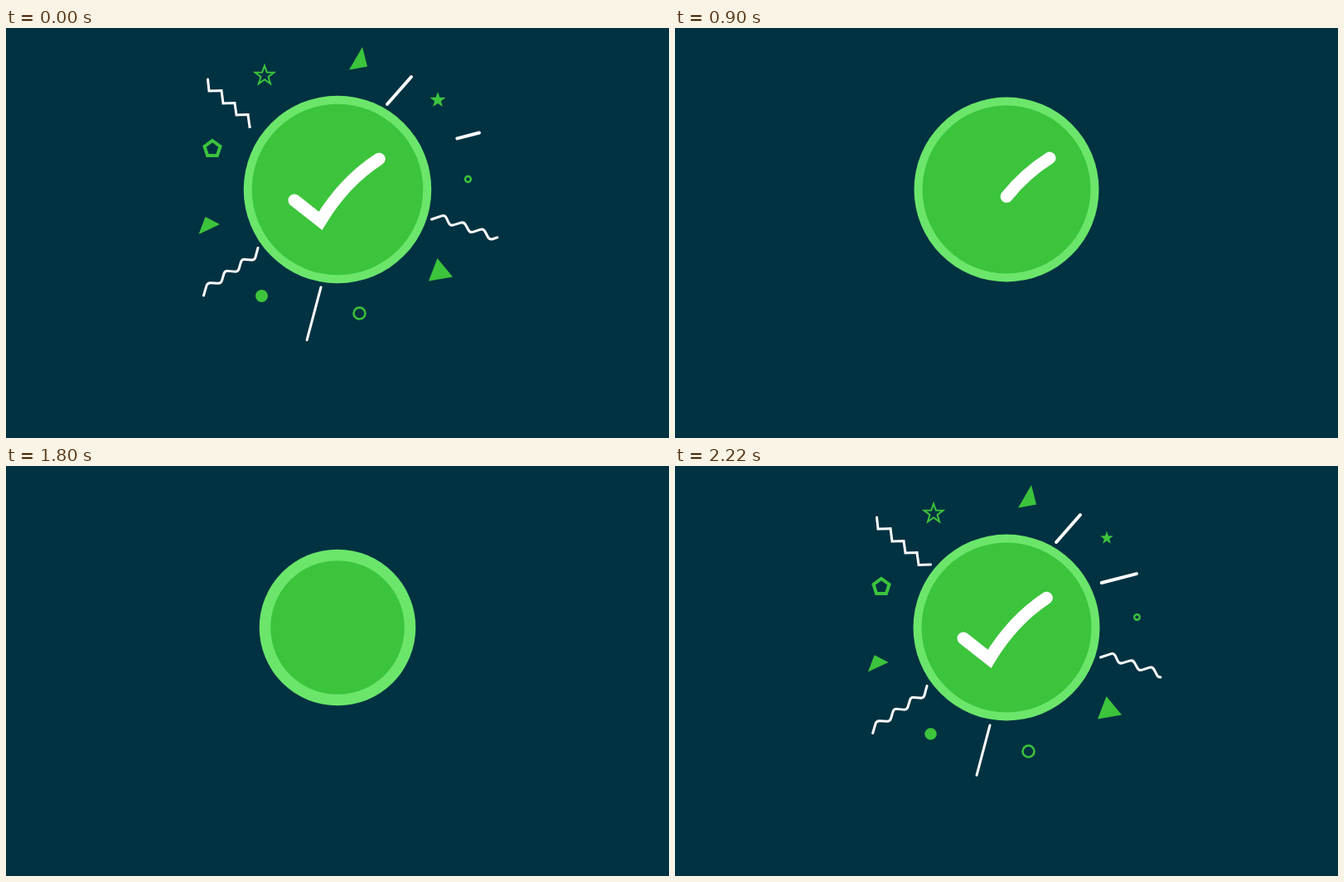
Recreate the animation shown at these times as an HTML page. Size 800 by 495 pixels, loop 2.25 s.

```html
<!DOCTYPE html>
<html lang="en">
<head>
<meta charset="utf-8">
<title>Success burst</title>
<style>
  html, body { margin: 0; width: 100%; height: 100%; overflow: hidden; background: #003241; }
  svg { display: block; width: 100%; height: 100%; }
</style>
</head>
<body>
<svg id="stage" viewBox="0 0 800 495"></svg>
<script>
const LOOP = 2250, STEP = 30, GREEN = '#3cc43c', LIGHT = '#6be66b';
const stage = document.getElementById('stage');

function add(tag, attrs) {
  const el = document.createElementNS('http://www.w3.org/2000/svg', tag);
  for (const key in attrs) el.setAttribute(key, attrs[key]);
  return stage.appendChild(el);
}

const clamp = x => Math.max(0, Math.min(1, x));
const part = (t, start, length) => clamp((t - start) / length);
const cubicOut = x => 1 - (1 - x) ** 3;
const sineInOut = x => (1 - Math.cos(Math.PI * x)) / 2;

// Polyline path whose corners are rounded off by the given distance.
function linePath(points, round = 0) {
  const towards = (a, b) => {
    const k = round / Math.hypot(b[0] - a[0], b[1] - a[1]);
    return [a[0] + (b[0] - a[0]) * k, a[1] + (b[1] - a[1]) * k];
  };
  return 'M' + points.map((p, i) => {
    if (!round || i === 0 || i === points.length - 1) return p;
    return towards(p, points[i - 1]) + 'Q' + p + ' ' + towards(p, points[i + 1]);
  }).join('L');
}

function radialPath(corners, radius, innerRatio) {
  const count = innerRatio ? corners * 2 : corners, points = [];
  for (let i = 0; i < count; i++) {
    const r = innerRatio && i % 2 ? radius * innerRatio : radius;
    const a = i / count * 2 * Math.PI;
    points.push([r * Math.sin(a), -r * Math.cos(a)]);
  }
  return linePath(points) + 'Z';
}

const discPath = r => `M${-r} 0A${r} ${r} 0 1 1 ${r} 0A${r} ${r} 0 1 1 ${-r} 0Z`;

function showSpan(el, from, to) {
  el.setAttribute('visibility', to - from > 0.002 ? 'visible' : 'hidden');
  el.setAttribute('stroke-dasharray', `${to - from} 3`);
  el.setAttribute('stroke-dashoffset', -from);
}

function stroke(d, width) {
  return add('path', {
    d, fill: 'none', stroke: '#fff', 'stroke-width': width, 'stroke-linecap': 'round',
    'stroke-miterlimit': 8, pathLength: 1
  });
}

// White rays: drawn outwards, then wiped from the inner end.
const rays = [
  { d: linePath([[507, 143], [571, 126.5]]), width: 4, start: 1910, grow: 160, wipe: 2195, span: 0.66 },
  { d: linePath([[308.5, 119], [294, 119.5], [292, 104.5], [278, 105], [276, 90.5], [262, 91],
      [260, 75.5], [245, 76], [243.5, 62]]), width: 3, start: 1980, grow: 250, wipe: 2225 },
  { d: linePath([[460, 92], [489, 59]]), width: 4, start: 1985, grow: 220, wipe: 2265 },
  { d: linePath([[304, 265.5], [300, 280.5], [284.5, 279], [280, 294.5], [264, 293], [259.5, 308.5],
      [243, 307.5], [238.5, 323]], 4), width: 3, start: 2010, grow: 250, wipe: 2290 },
  { d: linePath([[380, 313], [362.5, 379]]), width: 3, start: 2075, grow: 260, wipe: 2340 },
  { d: linePath([[513.5, 231], [529.5, 225.5], [536, 239], [552.5, 234], [560, 247.5], [576, 242],
      [583.5, 256], [598.5, 251]], 4), width: 3, start: 2090, grow: 260, wipe: 2340 }
].map(ray => ({ span: 1, ...ray, el: stroke(ray.d, ray.width) }));

// Green confetti: path around its own centre, stroke width 0 means filled.
const confetti = [
  { x: 425.5, y: 37, d: 'M4.5-14L10.5 9.5L-11.5 13.5Z', width: 0, start: 1938, leave: 310 },
  { x: 426.5, y: 344.5, d: discPath(7), width: 2.5, start: 1938, leave: 310 },
  { x: 312, y: 57.5, d: radialPath(5, 12, 0.4), width: 2, start: 2011, leave: 370 },
  { x: 249, y: 146, d: radialPath(5, 10), width: 4, start: 2011, leave: 370 },
  { x: 524, y: 293, d: 'M-3.5-15L15 7.5L-14 12.5Z', width: 0, start: 2011, leave: 370 },
  { x: 244.5, y: 238, d: 'M-4-10L13.5-1L-12 11Z', width: 0, start: 2085, leave: 430 },
  { x: 308.5, y: 323.5, d: discPath(7.5), width: 0, start: 2085, leave: 430 },
  { x: 557.5, y: 182.5, d: discPath(3.5), width: 2.5, start: 2100, leave: 490 },
  { x: 521, y: 87, d: radialPath(5, 11.5, 0.4), width: 0, start: 2151, leave: 490 }
].map(piece => ({
  ...piece,
  el: add('path', {
    d: piece.d, fill: piece.width ? 'none' : GREEN, 'stroke-miterlimit': 8,
    stroke: piece.width ? GREEN : 'none', 'stroke-width': piece.width
  })
}));

const rim = add('circle', { cx: 400, cy: 195, fill: LIGHT });
const face = add('circle', { cx: 400, cy: 195, fill: GREEN });
const tick = stroke('M348 208L379.5 232.8Q409 184 452 157', 15);

// Quick rise, then a damped swing around the resting radius.
function badgeRadius(t) {
  if (t < 1800) return 88.75 * part(t, 1650, 150) ** 2;
  const s = t - 2198;
  return 106.5 * (1 + 0.03 * Math.exp(-0.0064 * s) * Math.sin(0.017 * s));
}

function draw(time) {
  // The burst runs over the loop seam, so its timeline extends past one loop.
  const t = time < 1200 ? time + LOOP : time;

  for (const ray of rays) {
    const tail = part(t, ray.wipe, 72) ** 2;
    const head = ray.span * cubicOut(part(t, ray.start, ray.grow));
    showSpan(ray.el, tail, Math.min(1, head + tail));
  }

  for (const piece of confetti) {
    const size = cubicOut(part(t, piece.start, 200)) * (1 - part(t, LOOP + piece.leave, 135) ** 3);
    piece.el.setAttribute('transform', `translate(${piece.x} ${piece.y}) scale(${size})`);
    piece.el.setAttribute('visibility', size > 0.001 ? 'visible' : 'hidden');
  }

  const shrink = 1 - part(t, LOOP + 900, 180) ** 2;
  const radius = badgeRadius(t);
  const half = t > 1650 ? 5 + 1.75 * Math.max(0, (1900 - t) / 100) : 0;
  rim.setAttribute('r', (radius + half) * shrink);
  face.setAttribute('r', Math.max(0, radius - half) * shrink);

  tick.setAttribute('transform', `translate(400 195) scale(${shrink}) translate(-400 -195)`);
  showSpan(tick, sineInOut(part(t, LOOP + 700, 390)), cubicOut(part(t, 1895, 470)));
}

function frame() {
  draw(Math.floor(performance.now() % LOOP / STEP) * STEP);
  requestAnimationFrame(frame);
}
frame();
</script>
</body>
</html>
```
